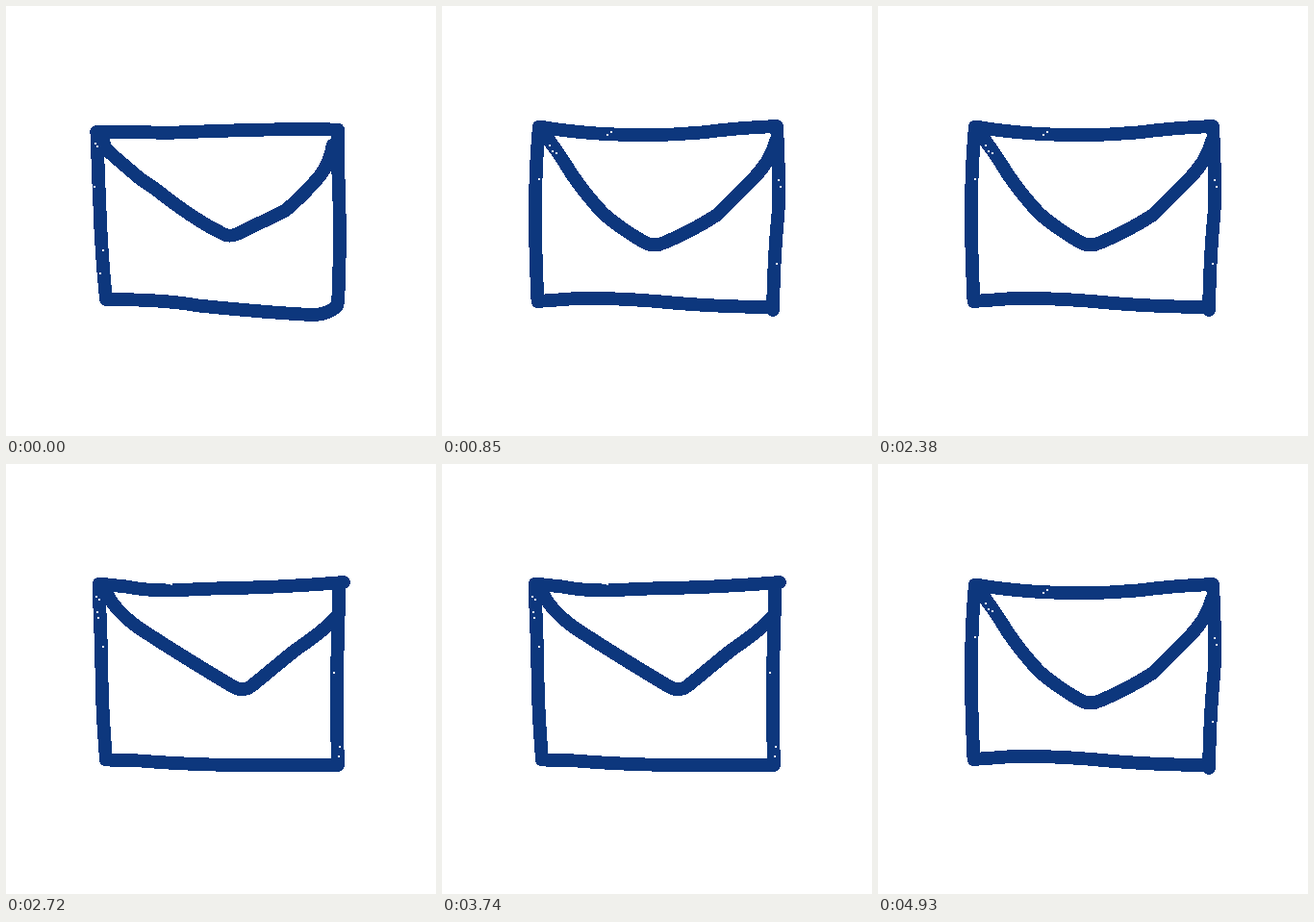
An HTML page that plays this animation: 447 px wide and 447 px high, repeating every 5.1 s.

```html
<!DOCTYPE html>
<html lang="en">
<head>
<meta charset="utf-8">
<title>Hand-drawn envelope</title>
<style>
  html, body { margin: 0; width: 100%; height: 100%; overflow: hidden; background: #fff; }
  svg { display: block; width: 100%; height: 100%; }
  g { visibility: hidden; }
  path { fill: none; stroke: #0d377d; stroke-width: 13.8; stroke-linecap: round; stroke-linejoin: round; shape-rendering: crispEdges; }
  .specks { stroke: #fff; stroke-width: 1.5; }
</style>
</head>
<body>
<svg viewBox="0 0 447 447">
  <!-- Each pose: outline, flap, dry-marker specks -->
  <g>
    <path d="M94 131Q130 130 165 132Q235 129 300 128L345 128.5L345 165Q348.5 230 345.5 300L344.500 311Q336 321 318 321C275 319 225 314 200 311.500Q165 305 104 305Q99 255 97.500 210Q95.500 165 94.500 131"/>
    <path d="M101 136L102 145Q105 150 113 157L140 180L155 190Q195 222 226 237Q232 240 239 237.500L290 213Q308 198 326 177Q337 163 339.500 145"/>
    <path class="specks" d="M93 143h0M95 146h0M92 188h0M101 254h0M98 278h0"/>
  </g>
  <g>
    <path d="M97 124.500L125 127.500Q145 131.500 170 131.500L215 129.500Q285 128.500 351 123M346 125L345.500 165Q342.500 240 345 313Q285 313.500 235 313Q180 312 140 308.500L104 307.500Q99.500 250 99.500 215Q98.500 170 96.500 130"/>
    <path d="M104 132Q110 149 136 169Q175 195 237 232Q246 237 255 231L300 194Q334 171 346 156"/>
    <path class="specks" d="M94 138h0M97 141h0M95 154h0M96 160h0M101 190h0M172 125h0M341 217h0M347 294h0M346 304h0"/>
  </g>
  <g>
    <path d="M101 125.500Q140 132 180 133.500Q225 135.500 270 131.500Q308 126.500 348 125Q351 180 349.500 215Q345 260 344 316M344 313Q295 313 245 309Q185 303 140 304L99.500 307Q96.500 245 97 200Q98 155 101 125.500"/>
    <path d="M105 132Q118 147 135 175Q150 197 168 216Q185 231 211 246Q221 251 231 246Q260 234 286 217L319 184Q342 162 347 140"/>
    <path class="specks" d="M172 134h0M176 131h0M112 145h0M115 151h0M119 153h0M101 180h0M350 181h0M352 188h0M348 268h0"/>
  </g>
</svg>
<script>
  const STEP = 170;
  const poses = [...document.querySelectorAll('g')];
  const start = performance.now();

  function draw() {
    const current = Math.floor((performance.now() - start) / STEP) % poses.length;
    poses.forEach((pose, i) => pose.style.visibility = i === current ? 'visible' : 'hidden');
    requestAnimationFrame(draw);
  }
  draw();
</script>
</body>
</html>
```
